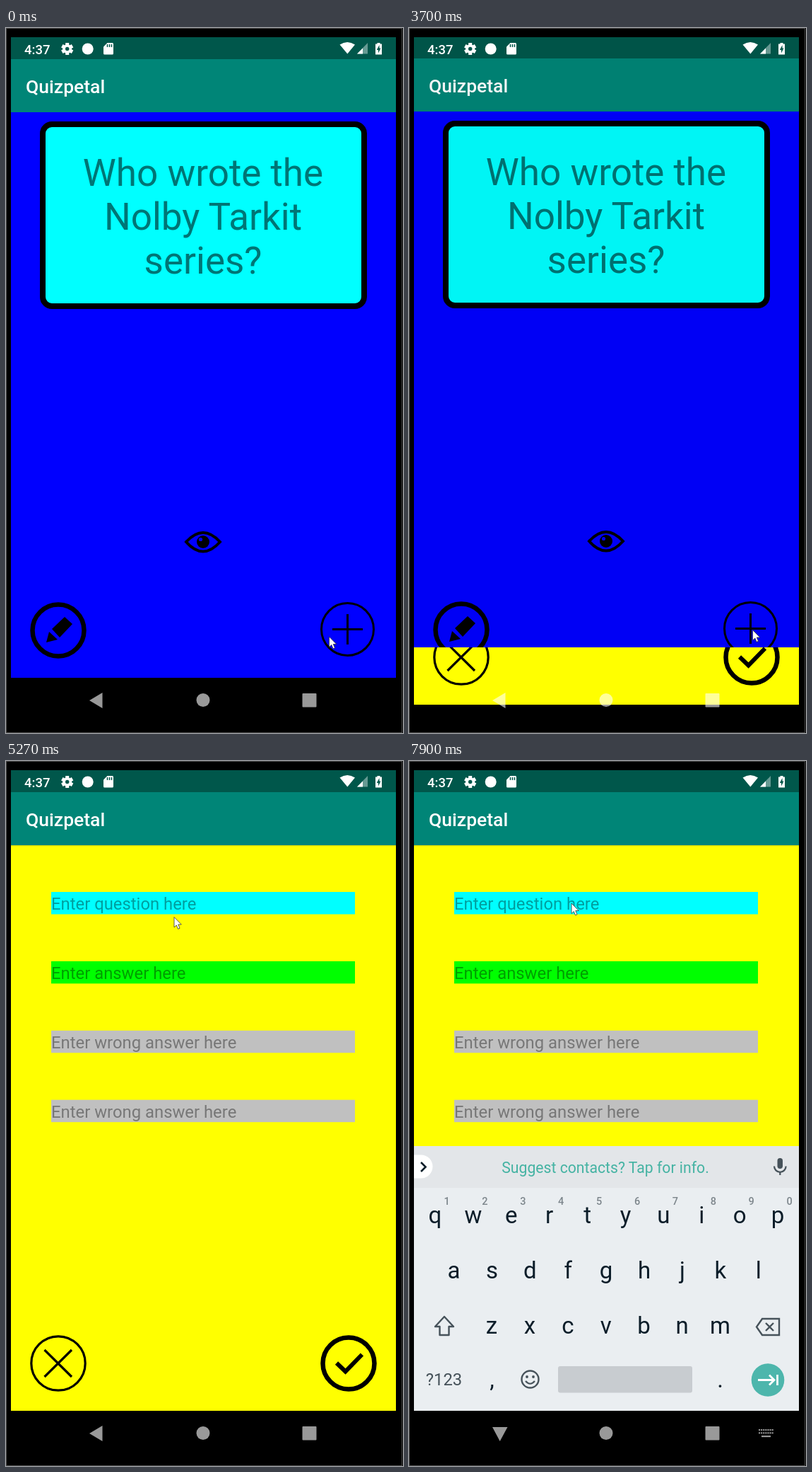
An HTML page for the animation above (8000 ms loop, 562 by 996 pixels).

```html
<!DOCTYPE html>
<html lang="en">
<head>
<meta charset="utf-8">
<title>Flashcard app</title>
<style>
  html, body { margin: 0; width: 100%; height: 100%; overflow: hidden; background: #000; }
  svg { display: block; width: 100%; height: 100%; font-family: Roboto, sans-serif; }
</style>
</head>
<body>
<svg id="stage" viewBox="0 0 562 996"></svg>
<script>
const LOOP = 8000;

const rect = (x, y, w, h, fill, extra = '') =>
  `<rect x="${x}" y="${y}" width="${w}" height="${h}" fill="${fill}" ${extra}/>`;
const circle = (x, y, r, extra = '') => `<circle cx="${x}" cy="${y}" r="${r}" ${extra}/>`;
const path = (d, extra = '') => `<path d="${d}" ${extra}/>`;
const line = (d, width, color = '#000', extra = '') =>
  path(d, `fill="none" stroke="${color}" stroke-width="${width}" ${extra}`);
const ring = (x, y, r, width) => circle(x, y, r, `fill="none" stroke="#000" stroke-width="${width}"`);
const text = (x, y, size, fill, str, extra = '') =>
  `<text x="${x}" y="${y}" font-size="${size}" fill="${fill}" ${extra}>${str}</text>`;
const MID = 'text-anchor="middle"';

// App window: status bar, toolbar, body and black navigation area
const appWindow = (color, content) =>
  rect(7, 13, 545, 31, '#00574b') + rect(7, 44, 545, 75, '#008577') +
  text(28, 92, 26.5, '#fff', 'Quizpetal', 'font-weight="500"') +
  rect(7, 119, 545, 799, color) + rect(7, 918, 545, 78, '#000') + content;

function cardScreen() {
  const lines = ['Who wrote the', 'Nolby Tarkit', 'series?'];
  return appWindow('#00f',
    rect(52, 136, 455, 257, '#0ff', 'rx="13" stroke="#000" stroke-width="8"') +
    lines.map((s, i) => text(279, 223 + 62 * i, 53, '#007575', s, MID)).join('') +
    line('M255 726Q279 700 303 726Q279 753 255 726Z', 4) +
    circle(279, 726, 9) + circle(275.5, 722.5, 2.6, 'fill="#00f"') +
    ring(74, 851, 36.5, 6.5) +
    path('M65 849 83 832 94 842 76 861ZM61 853 73 864 57 868Z') +
    ring(483.5, 849.5, 37, 3) + line('M462 849.5H505M483.5 828V871', 3));
}

function formScreen() {
  const fields = [['#0ff', 'question'], ['#0f0', 'answer'],
                  ['#c0c0c0', 'wrong answer'], ['#c0c0c0', 'wrong answer']];
  return appWindow('#ff0',
    rect(7, 119, 545, 1.5, '#000', 'opacity=".12"') +
    fields.map(([color, what], i) => {
      const y = 185 + 97.9 * i;
      return rect(64, y, 430, 31.5, color) +
        text(64, y + 25, 23.85, '#000', `Enter ${what} here`, 'fill-opacity=".38"');
    }).join('') +
    ring(74, 851, 38.2, 3.2) + line('M54.5 832 93 870M93 832 54.5 870', 3.2) +
    ring(485, 851, 36.5, 6.5) + line('M468 850.5 480.5 862.5 504 838.5', 6));
}

function keyboard() {
  const ink = '#0c1d29', grey = '#46525a';
  const step = 53.9;
  const row = (keys, x, y) =>
    [...keys].map((k, i) => text(x + step * i, y, 33, ink, k, MID)).join('');
  const digits = [...'1234567890']
    .map((d, i) => text(53.5 + step * i, 627, 14.5, '#7d868c', d, MID + ' font-weight="500"')).join('');
  return rect(7, 544, 545, 374, '#eaeef1') + rect(7, 544, 545, 59, '#e3e6e9') +
    path('M7 556.500H17a16.500 16.500 0 0 1 0 33H7Z', 'fill="#fff"') +
    line('M17 567 23.500 573.500 17 580', 2.6, ink) +
    text(278, 582, 21.2, '#45b3a3', 'Suggest contacts? Tap for info.', MID) +
    rect(521.5, 561, 7.5, 15, grey, 'rx="3.7"') +
    line('M517 572.500a8.300 8.300 0 0 0 16.600 0M525.300 580V585', 2.2, grey) +
    digits + row('qwertyuiop', 37, 653) + row('asdfghjkl', 63.5, 731) + row('zxcvbnm', 117, 809) +
    line('M50 785 37 799H43.500V811H56.500V799H63Z', 2.4, grey, 'stroke-linejoin="round"') +
    line('M500 788H524V811H500L492 799.500ZM505 794 516 805M516 794 505 805', 2.4, grey) +
    text(49.5, 882, 23.8, grey, '?123', MID) +
    text(117.5, 885, 33, ink, ',', MID) + text(440.5, 885, 33, ink, '.', MID) +
    circle(171.5, 873.5, 12, `fill="none" stroke="${grey}" stroke-width="2.4"`) +
    circle(167, 870, 1.9, `fill="${grey}"`) + circle(176, 870, 1.9, `fill="${grey}"`) +
    line('M165 876q6.500 7.500 13 0', 2.2, grey) +
    rect(211, 855, 190, 37.5, '#c8ccd0', 'rx="3"') +
    circle(508, 874.5, 23.3, 'fill="#4db6ac"') +
    line('M494 874.500H517M510 867.500 517 874.500 510 881.500M521.500 867V882', 2.8, '#fff');
}

function statusIcons() {
  const teeth = [0, 60, 120]
    .map(a => rect(84.2, 21, 5, 17, '#fff', `transform="rotate(${a} 86.7 29.5)"`)).join('');
  return '<g fill="#fff">' +
    text(26, 36.5, 18.5, '#fff', '4:37', 'font-weight="500"') + teeth +
    circle(86.7, 29.5, 6.4) + circle(86.7, 29.5, 2.7, 'fill="#00574b"') +
    circle(115.7, 29.5, 8) +
    path('M143.500 21H150.500Q152 21 152 22.500V36Q152 37.500 150.500 37.500H139.500Q138 37.500 138 36V26.500Z') +
    line('M143.500 23V27M146.500 23V27M149.500 23V27', 1.5, '#00574b') +
    path('M472.500 23.500Q483.300 16.500 494 23.500L483.300 36.500Z') +
    path('M512 21V36.500H497Z', 'opacity=".4"') + path('M505 28.500V36.500H497Z') +
    path('M525.500 21H529.500V22.500H532V37.500H523V22.500H525.500Z') +
    path('M528.500 24 524.800 31H527V35.500L530.500 28.500H528.500Z', 'fill="#00574b"') + '</g>';
}

function navIcons() {
  let dots = '';
  for (let i = 0; i < 14; i++) dots += rect(495 + 3.1 * (i % 7), i < 7 ? 944 : 948.3, 2.1, 2.1, '#fff');
  return '<g fill="#fff" opacity=".6">' +
    path('M118 950 136.500 939V961Z', 'id="back"') +
    circle(279, 949.5, 9.5) + rect(419.5, 940, 20, 19.5, '#fff', 'rx="1"') +
    `<g id="imeKey">${dots}${rect(499, 953, 13, 2.2, '#fff')}</g></g>`;
}

document.getElementById('stage').innerHTML =
  `<defs><clipPath id="screen">${rect(7, 13, 545, 983, '#000')}</clipPath>` +
  `<clipPath id="reveal">${rect(7, 13, 545, 983, '#000', 'id="revealBox"')}</clipPath></defs>` +
  rect(0, 0, 562, 996, '#000') +
  `<g clip-path="url(#screen)"><g id="card">${cardScreen()}</g>` +
  rect(7, 13, 545, 983, '#000', 'id="dim"') +
  `<g id="formClip" clip-path="url(#reveal)"><g id="form">${formScreen()}` +
  rect(64.5, 185, 2.2, 31.5, '#d81b60', 'id="caret"') + '</g></g>' +
  `<g id="ime">${keyboard()}</g></g>` + navIcons() + statusIcons() +
  rect(0.5, 0.5, 560, 995, 'none', 'stroke="#4a4a4a"') +
  path('M0 0V14.500L3.300 11.500 5.500 16.800 8 15.800 5.800 10.500H10.300Z',
    'id="pointer" fill="#fff" stroke="#333" stroke-width=".8"');

const el = {};
for (const id of ['card', 'dim', 'formClip', 'form', 'revealBox', 'caret', 'ime', 'back', 'imeKey', 'pointer'])
  el[id] = document.getElementById(id);

const pointer = [
  [0, 457.5, 860], [370, 464, 858], [540, 483, 864], [660, 474, 866], [780, 425, 838],
  [910, 360, 788], [1030, 319, 756], [1180, 342, 776], [1300, 367, 796], [1450, 388, 807],
  [1570, 409, 818], [1690, 427, 827], [1840, 451, 838], [2000, 485, 851], [2140, 486.5, 850.5],
  [4060, 477, 847], [4250, 440, 829], [4380, 369, 781], [4660, 299, 505], [4840, 283, 420],
  [4970, 269, 342], [5120, 251, 276], [5270, 238, 220.5], [5420, 232, 206], [5570, 230, 201]
];
// Time, slide progress, reveal progress, dimming
const opening = [
  [0, 0, 0, 0], [3700, .043, .149, .04], [3850, .24, .62, .07],
  [4060, .6, .911, .1], [4250, .9, .99, .1], [4380, 1, 1, .1]
];
// Time, offset, opacity
const imeSlide = [[0, 0, 0], [7750, 32, .6], [7900, 0, 1]];

const hold = (keys, t) => keys.reduce((last, k) => k[0] <= t ? k : last);
const move = (node, x, y) => node.setAttribute('transform', `translate(${x} ${y})`);
const show = (node, on) => node.setAttribute('visibility', on ? 'visible' : 'hidden');

function draw(t) {
  const [, x, y] = hold(pointer, t);
  move(el.pointer, x, y);

  const [, slide, reveal, dim] = hold(opening, t);
  const dy = Math.round(39.7 * (1 - slide));
  move(el.card, 0, Math.round(-18.5 * slide));
  move(el.form, 0, dy);
  el.dim.setAttribute('opacity', dim);
  el.revealBox.setAttribute('y', Math.round(13 + dy + 968 * (1 - reveal)));
  show(el.formClip, slide > 0);

  const caretOn = (t >= 6260 && t < 6500) || (t >= 7050 && t < 7450);
  el.caret.setAttribute('opacity', caretOn ? 1 : 0);

  const typing = t >= 7050;
  el.back.setAttribute('d', typing ? 'M118 941H139.500L128.700 961Z' : 'M118 950 136.500 939V961Z');
  show(el.imeKey, typing);

  const [, drop, alpha] = hold(imeSlide, t);
  move(el.ime, 0, drop);
  el.ime.setAttribute('opacity', alpha);
}

const start = performance.now();
function tick() {
  draw((performance.now() - start) % LOOP);
  requestAnimationFrame(tick);
}
tick();
</script>
</body>
</html>
```
